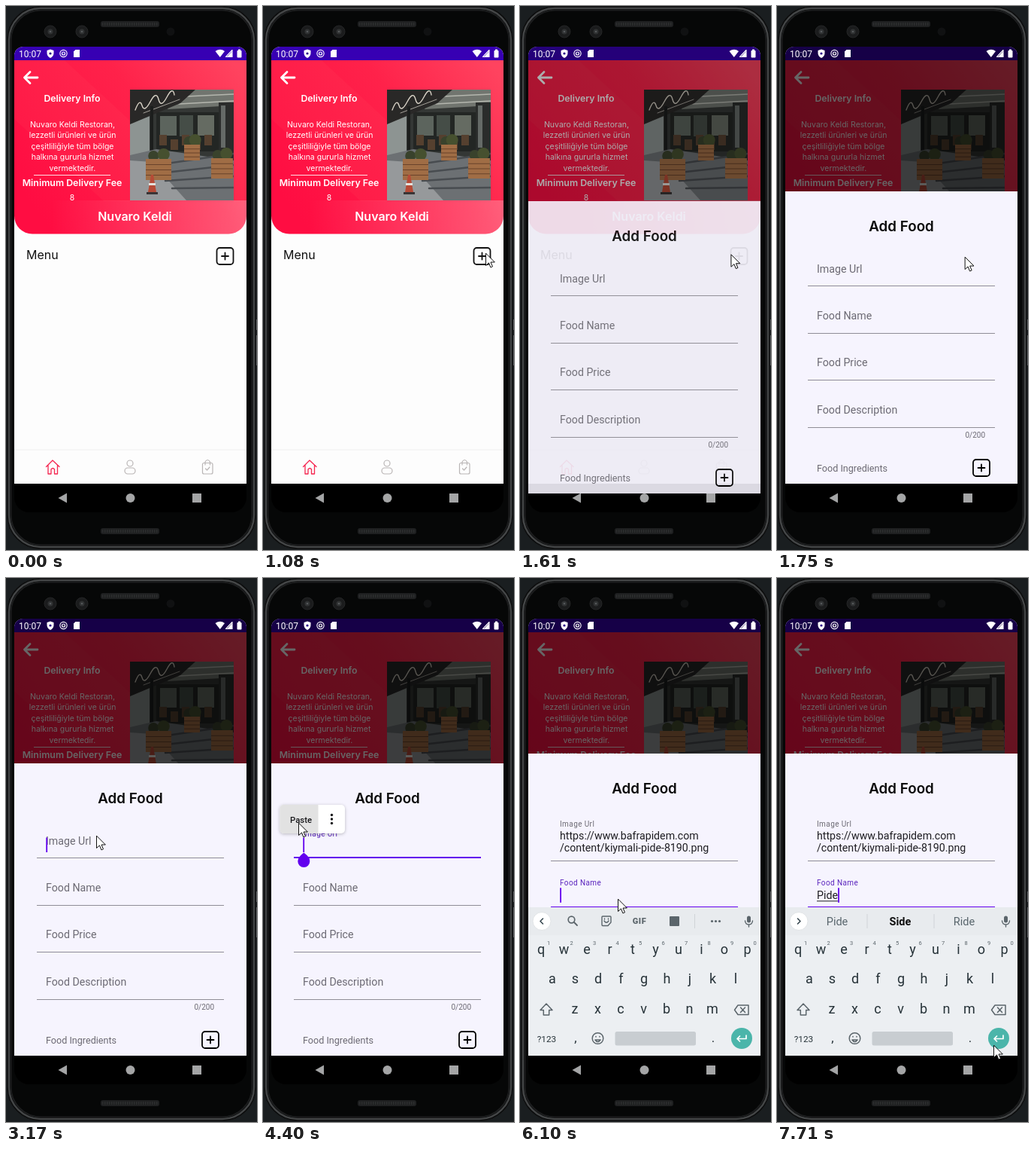
Write an HTML page with a canvas that moves like this. It is 334x722 px and loops after 8 s.

```html
<!DOCTYPE html>
<html lang="tr">
<head>
<meta charset="utf-8">
<title>Add Food</title>
<style>
html, body { margin: 0; width: 100%; height: 100%; overflow: hidden; background: #1a1e20; }
canvas { display: block; }
</style>
</head>
<body>
<canvas id="stage" width="334" height="722"></canvas>
<script>
const stage = document.getElementById('stage');
const layer = document.createElement('canvas');
layer.width = stage.width;
layer.height = stage.height;
let ctx = stage.getContext('2d');

const LOOP = 8000;
const HEAD = 'Inter, sans-serif', BODY = 'Roboto, sans-serif';
const PURPLE = '#6200ee', LABEL = '#6c6a73', KEY = '#263238', ICON = '#5b656b';

const clamp = v => Math.max(0, Math.min(1, v));
const lerp = (a, b, p) => a + (b - a) * p;
const ramp = (t, from, to) => clamp((t - from) / (to - from));
const easeOut = p => 1 - (1 - p) * (1 - p);
const easeInOut = p => p * p * (3 - 2 * p);
const within = (t, from, to) => t >= from && t < to;

function text(str, x, y, size, color, { font = BODY, weight = 400, align = 'left', spacing = 0 } = {}) {
  ctx.font = `${weight} ${size}px ${font}`;
  ctx.textAlign = align;
  ctx.letterSpacing = spacing + 'px';
  ctx.fillStyle = color;
  ctx.fillText(str, x, y);
}
function rect(x, y, w, h, color) {
  ctx.fillStyle = color;
  ctx.fillRect(x, y, w, h);
}
function paint(fill, stroke, width = 1) {
  if (fill) { ctx.fillStyle = fill; ctx.fill(); }
  if (stroke) { ctx.strokeStyle = stroke; ctx.lineWidth = width; ctx.stroke(); }
}
function round(x, y, w, h, r, fill, stroke, width) {
  ctx.beginPath();
  ctx.roundRect(x, y, w, h, r);
  paint(fill, stroke, width);
}
function circle(x, y, r, fill, stroke, width) {
  ctx.beginPath();
  ctx.arc(x, y, r, 0, Math.PI * 2);
  paint(fill, stroke, width);
}
function path(d, fill, stroke, width, x = 0, y = 0) {
  ctx.save();
  ctx.translate(x, y);
  const p = new Path2D(d);
  if (fill) { ctx.fillStyle = fill; ctx.fill(p); }
  if (stroke) {
    ctx.strokeStyle = stroke;
    ctx.lineWidth = width;
    ctx.lineCap = ctx.lineJoin = 'round';
    ctx.stroke(p);
  }
  ctx.restore();
}
function clipped(x, y, w, h, r, draw) {
  ctx.save();
  ctx.beginPath();
  ctx.roundRect(x, y, w, h, r);
  ctx.clip();
  draw();
  ctx.restore();
}
// Fades a whole group at once, so its parts do not show through each other.
function faded(alpha, draw) {
  const base = ctx;
  ctx = layer.getContext('2d');
  ctx.clearRect(0, 0, layer.width, layer.height);
  draw();
  ctx = base;
  ctx.save();
  ctx.globalAlpha = alpha;
  ctx.drawImage(layer, 0, 0);
  ctx.restore();
}

function drawPhone() {
  rect(0, 0, 334, 722, '#1a1e20');
  rect(332, 416, 2, 14, '#5a5c5e');
  rect(332, 437, 2, 40, '#5a5c5e');
  round(1.5, .5, 331, 720, 44, '#060707', '#161718', 1);
  round(4, 3, 326, 715, 42, null, '#444647', 2.5);
  round(6.5, 5.5, 321, 710, 40, null, '#1c1d1e', 2);
  for (const y of [20, 693]) {
    round(126, y, 78, 8, 3, '#1f2021');
    for (let x = 128; x < 203; x += 3) rect(x, y + 2, 1.5, 4, '#2d2e2f');
  }
  for (const x of [59, 101]) {
    circle(x, 34, 8, '#1b1c1d', '#252627', 1);
    circle(x, 34, 3.5, '#303233');
    circle(x, 34, 1.3, '#55585a');
  }
  circle(219, 34, 5.5, '#101112');
}

function drawPlanter(x, y, w, h) {
  circle(x + w * .3, y - 4, 7, '#39422c');
  circle(x + w * .7, y - 6, 8, '#46502f');
  rect(x, y, w, h, '#a06d45');
  for (let i = 1; i < 4; i++) rect(x, y + i * h / 4, w, 1, '#6a432b');
}

function drawPhoto() {
  clipped(165, 111, 138, 147, 0, () => {
    rect(165, 111, 138, 147, '#343735');
    rect(165, 145, 26, 55, '#8d9492');
    path('M225 111H303V132L215 137Z', '#71756f');
    path('M240 120L303 117M230 130L303 126', null, '#b4b6ae', 1.5);
    rect(200, 141, 84, 52, '#232624');
    rect(205, 146, 22, 26, '#5c645d');
    rect(231, 145, 18, 28, '#454d47');
    rect(255, 145, 22, 27, '#656b62');
    for (let i = 0; i < 5; i++) rect(204 + i * 15, 171 + (i % 2) * 6, 10, 14, '#55402f');
    path('M165 111H252L232 129L165 157Z', '#292827');
    path('M172 138Q178 122 181 132T192 127T203 124T214 121T224 118', null, '#d8d2c6', 1.4);
    path('M183 142L231 124', null, '#a7a39c', 1);
    rect(192, 133, 4, 76, '#1c1e1d');
    rect(283, 128, 20, 80, '#2a2c2b');
    rect(286, 132, 6, 56, '#656a67');
    path('M165 198L200 190L303 205V258H165Z', '#6c7073');
    path('M165 205L194 207L240 258H165Z', '#96999b');
    for (let i = 0; i < 4; i++) path(`M${194 + i * 9} ${212 + i * 10}L303 ${196 + i * 15}`, null, '#484c50', 2.5);
    drawPlanter(237, 184, 21, 21);
    drawPlanter(186, 203, 34, 28);
    drawPlanter(273, 202, 29, 27);
    path('M193 224H196L200 247H189Z', '#b64a36');
    rect(190, 235, 9, 3, '#e5e1dc');
    rect(187, 247, 15, 3, '#393536');
  });
}

function drawPlus(x, y, color = '#111') {
  round(x + 1, y + 1, 22, 22, 4, null, color, 1.8);
  path('M7.5 12H16.5M12 7.5V16.5', null, color, 1.8, x, y);
}

function drawHeader() {
  clipped(11, 72, 309, 230.5, [0, 0, 24, 24], () => {
    const g = ctx.createLinearGradient(300, 72, 40, 270);
    g.addColorStop(0, '#ff435f');
    g.addColorStop(.4, '#ff224a');
    g.addColorStop(1, '#ff0d42');
    rect(11, 72, 309, 231, g);
    path('M11 72H78L165 152V259H130L11 150Z', 'rgba(255,70,95,.14)');
    const band = ctx.createLinearGradient(60, 0, 320, 0);
    band.addColorStop(0, 'rgba(255,255,255,0)');
    band.addColorStop(1, 'rgba(255,255,255,.25)');
    rect(11, 258, 309, 45, band);
  });
  path('M42 95H24.5M32 87.5L24.5 95L32 102.5', null, '#fff', 2.8);
  const center = { font: HEAD, align: 'center' };
  const strong = { ...center, weight: 600 };
  text('Delivery Info', 88, 127, 12.3, '#fff', strong);
  ['Nuvaro Keldi Restoran,', 'lezzetli ürünleri ve ürün', 'çeşitliliğiyle tüm bölge', 'halkına gururla hizmet', 'vermektedir.']
    .forEach((line, i) => text(line, 88.5, 160.5 + i * 14.6, 10.5, '#fff', center));
  rect(37, 224, 102, 1, 'rgba(255,255,255,.85)');
  text('Minimum Delivery Fee', 88, 239, 12.4, '#fff', strong);
  text('8', 88, 258, 10.5, '#fff', center);
  drawPhoto();
  text('Nuvaro Keldi', 171.5, 284.5, 16, '#fff', strong);
}

function drawApp() {
  rect(11, 54, 309, 580, '#fdfdfd');
  rect(11, 54, 309, 18, '#3700b3');
  drawHeader();
  text('Menu', 27, 336, 16, '#111', { font: HEAD });
  drawPlus(279.5, 320);
  rect(11, 588.5, 309, 1, '#f0f0f0');
  path('M53.5 611.5L62 603L71 611.5M56 609.5V621H60V615Q62.3 612 64.5 615V621H68.5V609.5', null, '#f5254f', 1.3);
  circle(165, 607, 4, null, '#b9b5b5', 1.2);
  round(158, 613, 14, 8, 4, null, '#b9b5b5', 1.2);
  round(261.5, 606.5, 13.5, 14.5, 2, null, '#b9b5b5', 1.2);
  path('M265 609V605Q268.2 600 271.5 605V609M265.5 614L267.5 616L271 612', null, '#b9b5b5', 1.2);
}

function drawNav() {
  rect(11, 634, 309, 38, '#000');
  path('M69.5 653L81 646.5V659.5Z', '#a4a5a6');
  circle(165.5, 653, 6, '#a4a5a6');
  rect(248, 647, 12, 12, '#a4a5a6');
}

function drawStatus() {
  text('10:07', 17, 67.5, 12, '#fff');
  path('M59 57.5L63.5 59V63Q63 67 59 69Q55 67 54.5 63V59Z', '#fff');
  circle(59, 63, 1.6, '#2a0088');
  circle(76.5, 63, 4.6, null, '#fff', 1.2);
  circle(76.5, 63, 2, null, '#fff', 1.2);
  path('M92.5 58H98V68H90V60.5Z', '#fff');
  path('M278.5 60Q285 55.5 291 60L284.8 68Z', '#fff');
  path('M301 58.5V67.5H292.5Z', null, '#fff', 1.1);
  path('M299 62L301 60V67.5H294Z', '#fff');
  round(307.5, 59, 6, 9.5, 1, '#fff');
  rect(309, 57.5, 3, 2, '#fff');
}

// A field is laid out relative to the y where its block starts.
function drawField(label, y, grow, float, focused) {
  const size = lerp(14.2, 10, float);
  text(label, 53, y + lerp(107.5, 96.5, float), size, focused ? '#5a24bd' : LABEL, { spacing: .4 * float });
  const line = Math.round(y + 125.3 + grow);
  if (focused) rect(41, line - 1, 249, 2, PURPLE);
  else rect(41, line, 249, 1, '#8f8d96');
}
const drawCaret = (x, y) => rect(x, y, 1.8, 19.5, PURPLE);

function typedName(t) {
  return 'Pide'.slice(0, [6240, 6430, 6630, 6700].filter(at => t >= at).length);
}

function drawSheet(t, top) {
  rect(11, top, 309, 460, '#f6f4fe');
  text('Add Food', 165.5, top + 53, 18.8, '#090909', { font: HEAD, weight: 600, align: 'center' });

  const pasted = t >= 4540, nameFocus = t >= 4890;
  const grow = pasted ? 16.4 : 0;
  const urlFocus = t >= 3640 && !nameFocus;
  drawField('Image Url', top, grow, easeInOut(ramp(t, 3620, 3800)), urlFocus);
  if (pasted) {
    text('https://www.bafrapidem.com', 53, top + 114, 14.2, '#1f1e22');
    text('/content/kiymali-pide-8190.png', 53, top + 130.4, 14.2, '#1f1e22');
    if (!nameFocus) drawCaret(254.5, top + 115);
  } else if (within(t, 2090, 2380) || t >= 3170) {
    drawCaret(53.3, top + 98.5);
  }

  const nameY = top + 62.4 + grow;
  drawField('Food Name', nameY, 0, easeInOut(ramp(t, 4890, 5060)), nameFocus);
  const typed = typedName(t);
  text(typed, 53, nameY + 114.5, 14.2, '#1f1e22');
  const width = ctx.measureText(typed).width;
  if (typed) rect(53, nameY + 116.5, width, 1, '#1f1e22');
  if (nameFocus && !within(t, 5640, 6100) && !within(t, 7160, 7640)) drawCaret(53.2 + width, nameY + 99.5);

  drawField('Food Price', top + 124.8 + grow, 0, 0, false);
  drawField('Food Description', top + 187.2 + grow, 0, 0, false);
  text('0/200', 277, top + 326.5 + grow, 10, LABEL, { align: 'right' });
  text('Food Ingredients', 53, top + 371.5 + grow, 12.6, LABEL);
  drawPlus(260, top + 355 + grow, '#000');
}

function drawPastePopup(t) {
  if (within(t, 3840, 4540)) {
    path('M54.3 364.5Q63 371 62.3 376A8 8 0 1 1 46.3 376Q46 371 54.3 364.5Z', PURPLE);
  }
  if (!within(t, 3980, 4560)) return;
  ctx.save();
  ctx.globalAlpha = ramp(t, 3940, 4080);
  ctx.shadowColor = 'rgba(0,0,0,.25)';
  ctx.shadowBlur = 4;
  ctx.shadowOffsetY = 1;
  round(22.5, 301, 86.5, 38, 5, '#fff');
  ctx.shadowColor = 'transparent';
  if (t >= 4330) round(22.5, 301, 51, 38, [5, 0, 0, 5], '#e2e2e2');
  text('Paste', 50.5, 324.5, 11.3, '#17171a', { weight: 500, align: 'center' });
  for (const y of [314.5, 320, 325.5]) circle(91.5, y, 1.7, '#17171a');
  ctx.restore();
}

function suggestions(typed) {
  return { P: ['P', 'I', 'Pm'], Pi: ['Pi', 'Pick', 'Pic'], Pid: ['Pid', 'Did', 'Paid'], Pide: ['Pide', 'Side', 'Ride'] }[typed];
}

function drawToolbar(typed) {
  circle(29, 455.5, 12, '#fff', '#e1e4e6', 1);
  path(typed ? 'M27.5 452L31 455.5L27.5 459' : 'M30.5 452L27 455.5L30.5 459', null, '#37474f', 1.6);
  round(302, 448.5, 5, 9, 2.5, ICON);
  path('M299.5 455Q300 460 304.5 460T309.5 455M304.5 460V463', null, ICON, 1.4);
  if (typed) {
    suggestions(typed).forEach((word, i) => text(word, [80, 164, 249][i], 461, 14.5, i === 1 ? '#111' : '#58656c',
      { align: 'center', weight: i === 1 ? 700 : 400 }));
    for (const x of [119.5, 208.5]) rect(x, 446, 1, 19, '#cfd4d7');
    return;
  }
  circle(68.5, 453.5, 4.3, null, ICON, 1.7);
  path('M72 457L76 461', null, ICON, 1.8);
  path('M110 449H120Q121 449 121 450V457L117 461.5H110Q109 461.5 109 460V450Q109 449 110 449ZM112 455Q115 459.5 118 455M112.5 452V453M117.5 452V453', null, ICON, 1.4);
  text('GIF', 159, 459, 11, ICON, { weight: 900, align: 'center', spacing: .5 });
  round(199, 449, 13, 13, 1, ICON);
  rect(232, 446, 1, 19, '#cfd4d7');
  for (const x of [255.5, 260.5, 265.5]) circle(x, 455.5, 1.6, ICON);
}

function drawKeyboard(t) {
  const rise = easeOut(ramp(t, 4960, 5300));
  if (!rise) return;
  clipped(11, 54, 309, 580, 0, () => {
    ctx.translate(0, (1 - rise) * 197);
    rect(11, 437, 309, 197, '#eceff2');
    rect(11, 437, 309, 37, '#e8ebee');
    drawToolbar(typedName(t));
    const upper = within(t, 6170, 6240);
    [['qwertyuiop', 28, 498.5], ['asdfghjkl', 43, 538], ['zxcvbnm', 73, 578]].forEach(([keys, x0, y]) =>
      [...keys].forEach((key, i) => text(upper ? key.toUpperCase() : key, x0 + i * 30.5, y, 18, KEY, { align: 'center' })));
    for (let i = 0; i < 10; i++) text((i + 1) % 10, 38 + i * 30.5, 486.5, 7.5, ICON, { align: 'center' });
    path('M35 565L43 573.5H38.7V580H31.3V573.5H27Z', upper ? ICON : null, ICON, 1.5);
    path('M290 567H304V579.5H290L285.5 573.2ZM293.5 570L299.5 576.5M299.5 570L293.5 576.5', null, ICON, 1.5);
    text('?123', 35.5, 615.5, 11.8, KEY, { align: 'center' });
    text(',', 74, 616, 17, KEY, { align: 'center' });
    text('.', 257, 616, 17, KEY, { align: 'center' });
    circle(103.5, 611, 7.3, null, ICON, 1.5);
    path('M100 613Q103.5 618 107 613ZM101 608.5V609M106 608.5V609', null, ICON, 1.6);
    round(126.5, 602, 107.5, 18.5, 2.5, '#c8cdd1');
    circle(295, 611, 14, '#4bb5aa');
    path('M301 607V611.5H289M292.5 608L289 611.5L292.5 615', null, '#fff', 1.7);
  });
}

const CURSOR_PATH = [
  [250, 312, 488], [880, 296, 328], [1540, 296, 328], [1750, 250, 333], [2100, 120, 342], [3300, 120, 342],
  [3580, 39, 328], [3980, 39, 328], [4200, 47, 325], [4580, 47, 325], [4840, 130, 426], [7160, 130, 426], [7640, 288, 620]
];
function drawCursor(t) {
  if (t < 250) return;
  const next = CURSOR_PATH.findIndex(([at]) => at > t);
  let [, x, y] = CURSOR_PATH.at(-1);
  if (next > 0) {
    const [t0, x0, y0] = CURSOR_PATH[next - 1], [t1, x1, y1] = CURSOR_PATH[next];
    const p = ramp(t, t0, t1), eased = within(t, 1540, 2100) ? p : easeInOut(p);
    x = lerp(x0, x1, eased);
    y = lerp(y0, y1, eased);
  }
  if (within(t, 950, 1080) || within(t, 3600, 3900)) circle(x, y, 15, 'rgba(255,255,0,.35)');
  path('M0 0V16L4 12.4L6.4 18.4L9 17.3L6.5 11.5H11.5Z', '#fff', '#111', 1, x + .5, y + .5);
}

function drawScreen(t) {
  drawApp();
  drawNav();
  rect(11, 54, 309, 580, `rgba(0,0,0,${.6 * ramp(t, 1495, 1710)})`);
  drawStatus();
  const enter = easeOut(ramp(t, 1470, 1680));
  if (!enter) return;
  const slide = Math.round(117 * (1 - enter));
  const top = lerp(246, 233, easeOut(ramp(t, 4960, 5300)));
  faded(enter, () => clipped(11, 54, 309, 580 + slide, 0, () => drawSheet(t, top + slide)));
  drawPastePopup(t);
  drawKeyboard(t);
}

function frame(now) {
  const t = now % LOOP;
  drawPhone();
  clipped(11, 54, 309, 618, [12, 12, 20, 20], () => drawScreen(t));
  drawCursor(t);
  requestAnimationFrame(frame);
}
requestAnimationFrame(frame);
</script>
</body>
</html>
```
